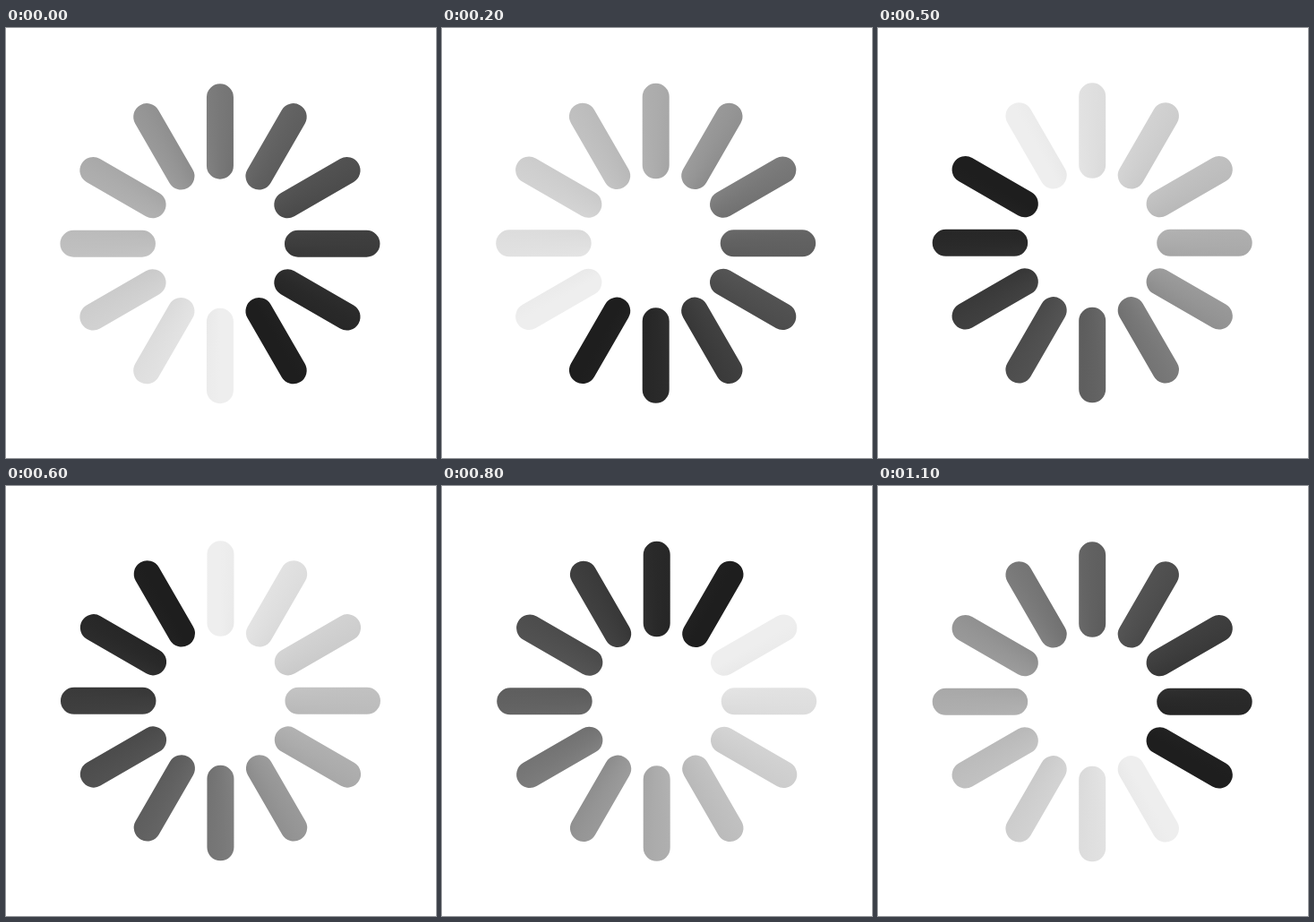
Write an HTML page with a canvas that moves like this. It is 480x480 px and loops after 1200 ms.

```html
<!DOCTYPE html>
<html lang="en">
<head>
<meta charset="utf-8">
<title>Loading spinner</title>
<style>
  html, body { margin: 0; width: 100%; height: 100%; overflow: hidden; background: #fff; }
  canvas { display: block; width: 480px; height: 480px; }
</style>
</head>
<body>
<canvas id="stage" width="480" height="480"></canvas>
<script>
  const ctx = document.getElementById('stage').getContext('2d');
  const SPOKES = 12, STEP_MS = 100;
  const TURN = 2 * Math.PI / SPOKES;
  const PIVOT = { x: 239.2, y: 240.3 };
  const WOBBLE = 0.5; // ring centre sits slightly off the pivot
  const INNER = 87, OUTER = 163.5, WIDTH = 30;

  // Grey levels clockwise, from the faint tail to the dark head
  const greys = [238, 223, 207, 190, 172, 149, 120, 97, 79, 61, 41, 30];
  const shade = ctx.createConicGradient(2.5 * TURN, 0, 0);
  greys.forEach((g, i) => shade.addColorStop((i + 0.5) / SPOKES, `rgb(${g},${g},${g})`));

  const ring = new Path2D();
  for (let i = 0; i < SPOKES; i++) {
    const c = Math.cos(i * TURN), s = Math.sin(i * TURN);
    ring.moveTo(INNER * c, INNER * s);
    ring.lineTo(OUTER * c, OUTER * s);
  }

  function draw(step) {
    ctx.setTransform(1, 0, 0, 1, 0, 0);
    ctx.fillStyle = '#fff';
    ctx.fillRect(0, 0, 480, 480);
    ctx.translate(PIVOT.x, PIVOT.y);
    ctx.rotate(step * TURN);
    ctx.translate(WOBBLE * Math.cos(4 * TURN), WOBBLE * Math.sin(4 * TURN));
    ctx.lineWidth = WIDTH;
    ctx.lineCap = 'round';
    ctx.strokeStyle = shade;
    ctx.stroke(ring);
  }

  const start = performance.now();
  function tick() {
    const elapsed = Math.max(0, performance.now() - start);
    draw(Math.floor(elapsed / STEP_MS) % SPOKES);
    requestAnimationFrame(tick);
  }
  tick();
</script>
</body>
</html>
```
